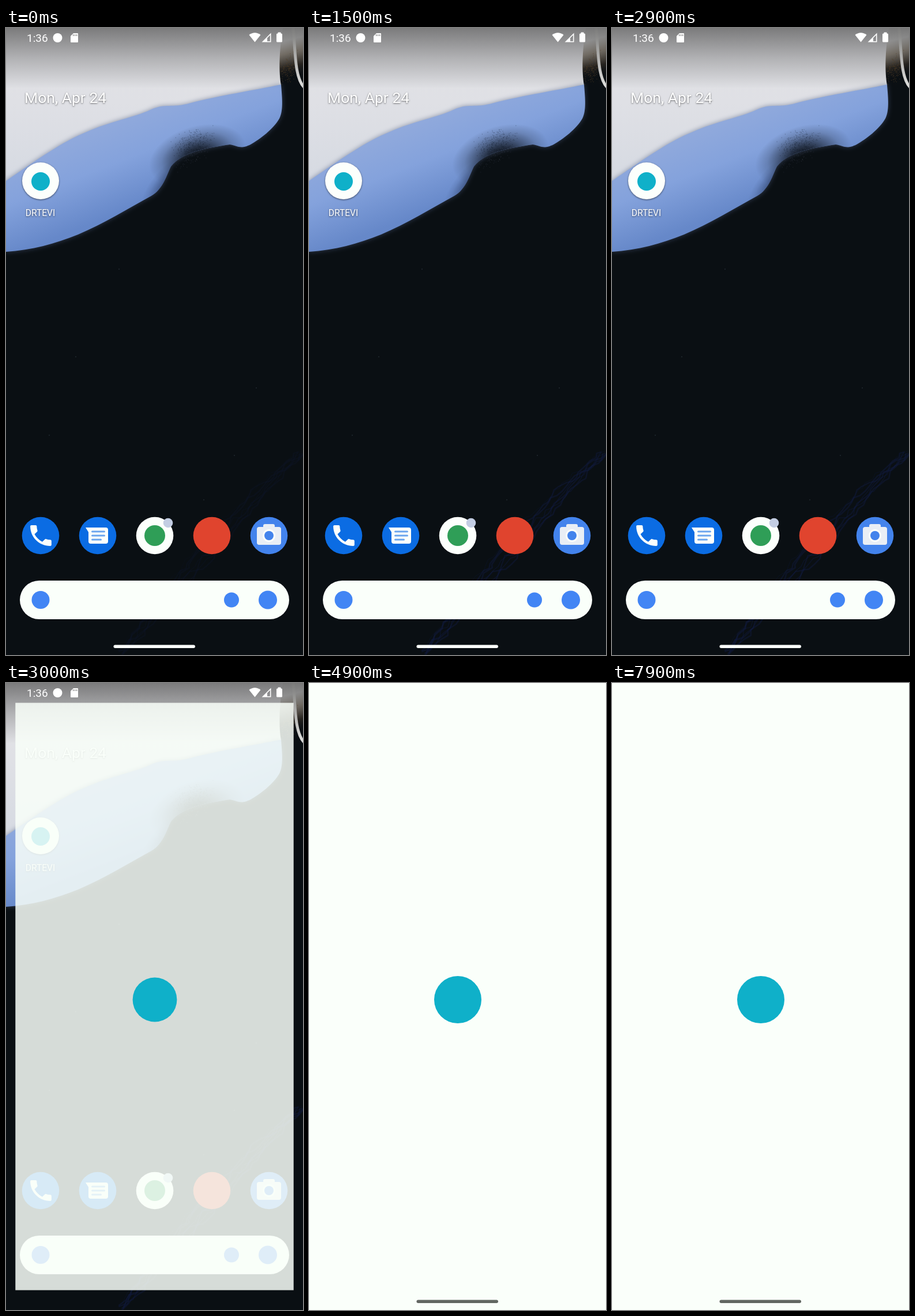
Animation, 515 px wide and 1087 px high, one loop 8 s. Source, as an HTML page with a canvas:

```html
<!DOCTYPE html>
<html lang="pt">
<head>
<meta charset="utf-8">
<title>App launch</title>
<style>
  html, body { margin: 0; width: 100%; height: 100%; overflow: hidden; background: #0a0f13; }
  canvas { display: block; width: 515px; height: 1087px; }
</style>
</head>
<body>
<canvas id="stage" width="515" height="1087"></canvas>
<script>
const W = 515, H = 1087, LOOP = 8000, STEP = 100, OPEN = 2900, OPENED = 3300;
const WHITE = '#fafffa', TEAL = '#0fb0c9', BLUE = '#0b6ce3';
const FONT = 'Roboto, "Open Sans", sans-serif';
const stage = document.getElementById('stage').getContext('2d');

const clamp = v => Math.max(0, Math.min(1, v));

function layer(paint) {
  const c = document.createElement('canvas');
  c.width = W;
  c.height = H;
  paint(c.getContext('2d'));
  return c;
}

function seeded(seed) {
  return () => (seed = (seed * 16807) % 2147483647) / 2147483647;
}

function gradient(g, x0, y0, x1, y1, ...colors) {
  const fill = g.createLinearGradient(x0, y0, x1, y1);
  colors.forEach((c, i) => fill.addColorStop(i / (colors.length - 1), c));
  return fill;
}

function disc(g, x, y, r, color) {
  g.fillStyle = color;
  g.beginPath();
  g.arc(x, y, r, 0, Math.PI * 2);
  g.fill();
}

function pill(g, x, y, w, h, r, color) {
  g.fillStyle = color;
  g.beginPath();
  g.roundRect(x, y, w, h, r);
  g.fill();
}

function shape(g, path, color) {
  g.fillStyle = color;
  g.fill(new Path2D(path));
}

function label(g, text, x, y, size, align = 'left') {
  g.font = `${size}px ${FONT}`;
  g.textAlign = align;
  g.fillStyle = '#fff';
  g.fillText(text, x, y);
}

function shadow(g, color, blur, dy = 0) {
  g.shadowColor = color;
  g.shadowBlur = blur;
  g.shadowOffsetY = dy;
}

// Soft tilted ellipse that fades from its centre
function haze(g, x, y, rx, ry, tilt, rgb, alpha) {
  g.save();
  g.translate(x, y);
  g.rotate(tilt);
  g.scale(rx, ry);
  const fill = g.createRadialGradient(0, 0, 0, 0, 0, 1);
  [1, 0.85, 0.5, 0.18, 0].forEach((k, i) => fill.addColorStop(i / 4, `rgba(${rgb},${alpha * k})`));
  disc(g, 0, 0, 1, fill);
  g.restore();
}

function specks(g, rnd, n, x, y, w, h, slope, color) {
  g.fillStyle = color;
  for (let i = 0; i < n; i++) {
    const u = rnd() + rnd() - 1, v = rnd() + rnd() - 1;
    g.fillRect(x + u * w / 2, y + v * h + u * w / 2 * slope, 1, 1);
  }
}

const wallpaper = layer(g => {
  const rnd = seeded(41);
  const petal = new Path2D('M0 265C60 224 100 196 140 180C180 162 225 154 250 142' +
    'C278 129 285 140 320 130C370 117 430 108 477 98' +
    'C478 115 482 142 474 157C464 175 440 193 424 202C406 211 402 204 388 202C350 208 308 213 286 240' +
    'C279 254 272 280 252 291C210 314 170 339 125 358C85 374 45 385 0 388Z');

  g.fillStyle = '#0a0f13';
  g.fillRect(0, 0, W, H);

  // Pale sheet, fading out at the right corner
  g.fillStyle = gradient(g, 484, 22, 500, 88, '#dcdcdc', '#938b80', '#2b2722', 'rgba(10,15,19,0)');
  g.fillRect(465, 0, 50, 110);
  specks(g, rnd, 130, 490, 70, 40, 26, -0.6, 'rgba(105,78,45,.7)');
  shape(g, 'M0 0H480C475 30 472 70 477 99L320 136L240 160L90 215L0 272Z',
    gradient(g, 0, 0, 0, 260, '#e2e2e4', '#dfe0e5', '#d6dae2'));

  g.save();
  shadow(g, 'rgba(75,90,125,.6)', 8);
  g.fillStyle = gradient(g, 190, 145, 250, 300, '#93abdc', '#84a2dc', '#6688c9');
  g.fill(petal);
  g.restore();

  g.save();
  g.clip(petal);
  haze(g, 332, 222, 86, 52, -0.3, '10,15,22', 0.95);
  haze(g, 282, 268, 66, 26, -0.85, '30,45,80', 0.6);
  specks(g, rnd, 260, 325, 200, 80, 26, -0.3, 'rgba(12,18,32,.4)');
  g.restore();
  specks(g, rnd, 70, 320, 226, 70, 16, -0.4, 'rgba(105,110,130,.25)');

  g.lineWidth = 5;
  g.strokeStyle = '#e2e2e0';
  g.stroke(new Path2D('M498 0C502 40 500 85 517 103'));

  g.fillStyle = gradient(g, 0, 0, 0, 105, 'rgba(20,20,20,.5)', 'rgba(20,20,20,.23)', 'rgba(20,20,20,0)');
  g.fillRect(0, 0, W, 105);

  [[121, 570], [75, 706], [343, 818], [396, 741], [434, 624], [196, 418]].forEach(([x, y]) =>
    disc(g, x, y, 0.8, '#343b45'));
});

// Faint blue cracks in the lower right
const veins = layer(g => {
  const rnd = seeded(7);
  g.lineJoin = 'round';
  for (let i = 0; i < 7; i++) {
    const off = i - 3;
    g.strokeStyle = 'rgba(18,29,68,.4)';
    g.lineWidth = 0.8 + rnd() * 2;
    g.beginPath();
    for (let k = 0; k <= 40; k++) {
      const u = k / 40, spread = 1 + 2.5 * Math.sin(u * Math.PI);
      g.lineTo(512 - 312 * u + (rnd() - 0.5) * 9 + off * spread,
        738 + 345 * Math.pow(u, 1.12) + (rnd() - 0.5) * 9 + off * spread);
    }
    g.stroke();
  }
});

const icons = layer(g => {
  const y = 880;
  g.save();
  shadow(g, 'rgba(0,0,0,.55)', 3, 1);
  disc(g, 60, 265, 32, '#fcfffc');
  label(g, 'Mon, Apr 24', 32, 130, 26.5);
  label(g, 'DRTEVI', 59.5, 326, 15.6, 'center');
  g.restore();
  disc(g, 60, 266, 16, TEAL);

  [BLUE, BLUE, '#fcfffc', '#e0442e', '#4383ec'].forEach((c, i) => disc(g, 60 + 99 * i, y, 32.3, c));

  g.save();
  g.translate(36, y - 24);
  g.scale(2.04, 2);
  shape(g, 'M6.6 10.8c1.4 2.8 3.8 5.1 6.6 6.6l2.2-2.2c.3-.3.7-.4 1-.2 1.1.4 2.3.6 3.6.6.5 0 1 .4 1 1V20c0 .6-.5 1-1 1C10.6 21 3 13.4 3 4c0-.6.4-1 1-1h3.5c.6 0 1 .4 1 1 0 1.2.2 2.4.6 3.6.1.3 0 .7-.3 1z', '#fcfffc');
  g.restore();

  shape(g, 'M138 866H173Q177 866 177 870V890Q177 894 173 894H147Q143 894 143 890V874Z', '#fcfffc');
  [[873, 24], [880, 24], [887, 18]].forEach(([ly, w]) => pill(g, 148, ly - 1.5, w, 3, 1.5, '#6ba5ee'));

  disc(g, 258, y, 18, '#2f9e57');
  disc(g, 281, 858, 8.3, '#c3cde3');

  pill(g, 446, 860, 20, 12, 3, '#e9eef5');
  pill(g, 435, 865, 42, 31, 4, '#e9eef5');
  disc(g, 456, y, 11, '#fcfffc');
  disc(g, 456, y, 8, '#4383ec');

  pill(g, 24, 958, 467, 67, 33.5, WHITE);
  [[60, 15.5], [391, 13], [454, 16]].forEach(([x, r]) => disc(g, x, 991.5, r, '#4285f4'));
});

const status = layer(g => {
  label(g, '1:36', 36, 23.5, 19);
  disc(g, 89.5, 17, 8, '#fff');
  shape(g, 'M117 9H124Q125 9 125 10V24Q125 25 124 25H113Q112 25 112 24V14Z', '#fff');
  [116, 119, 122].forEach(x => pill(g, x, 11, 1.3, 3, 0, '#888'));
  shape(g, 'M421.5 12Q431.5 4.5 441.5 12L431.5 24.5Z', '#fff');
  g.strokeStyle = '#fff';
  g.lineWidth = 1.6;
  g.stroke(new Path2D('M458.7 10.500V23.700H445.500Z'));
  shape(g, 'M453 16V24H445Z', '#fff');
  pill(g, 469, 9.5, 10, 15, 1.5, '#fff');
  pill(g, 471.5, 7.5, 5, 3, 0.5, '#fff');
});

function home(t) {
  stage.drawImage(wallpaper, 0, 0);
  stage.globalAlpha = 0.4 + 0.6 * clamp(t / 1000);
  stage.drawImage(veins, 0, 0);
  stage.globalAlpha = 1;
  stage.drawImage(icons, 0, 0);
}

function splash(t) {
  const p = clamp((t - OPEN) / (OPENED - OPEN));
  const scale = 0.85 + 0.15 * (1 - Math.pow(1 - p, 3));
  stage.save();
  stage.globalAlpha = clamp((t - OPEN) / 117);
  stage.translate(W / 2, H / 2);
  stage.scale(scale, scale);
  stage.translate(-W / 2, -H / 2);
  stage.fillStyle = WHITE;
  stage.fillRect(0, 0, W, H);
  stage.restore();

  stage.save();
  stage.translate(258, 549);
  stage.scale(scale, scale);
  if (t > OPEN) disc(stage, 0, 0, 41, TEAL);
  stage.restore();
}

function handle(t) {
  const color = t <= OPEN ? '#fcfffc' : `rgba(98,103,98,${clamp((t - 3400) / 700)})`;
  pill(stage, 186.5, 1069.5, 141.5, 5.5, 2.75, color);
}

function draw(now) {
  const t = Math.floor((now % LOOP) / STEP) * STEP;
  if (t < OPENED) home(t);
  if (t > OPEN) splash(t);
  if (t < OPENED) stage.drawImage(status, 0, 0);
  handle(t);
}

let start;
function tick(now) {
  start ??= now;
  draw(Math.max(0, now - start));
  requestAnimationFrame(tick);
}
requestAnimationFrame(tick);
</script>
</body>
</html>
```
